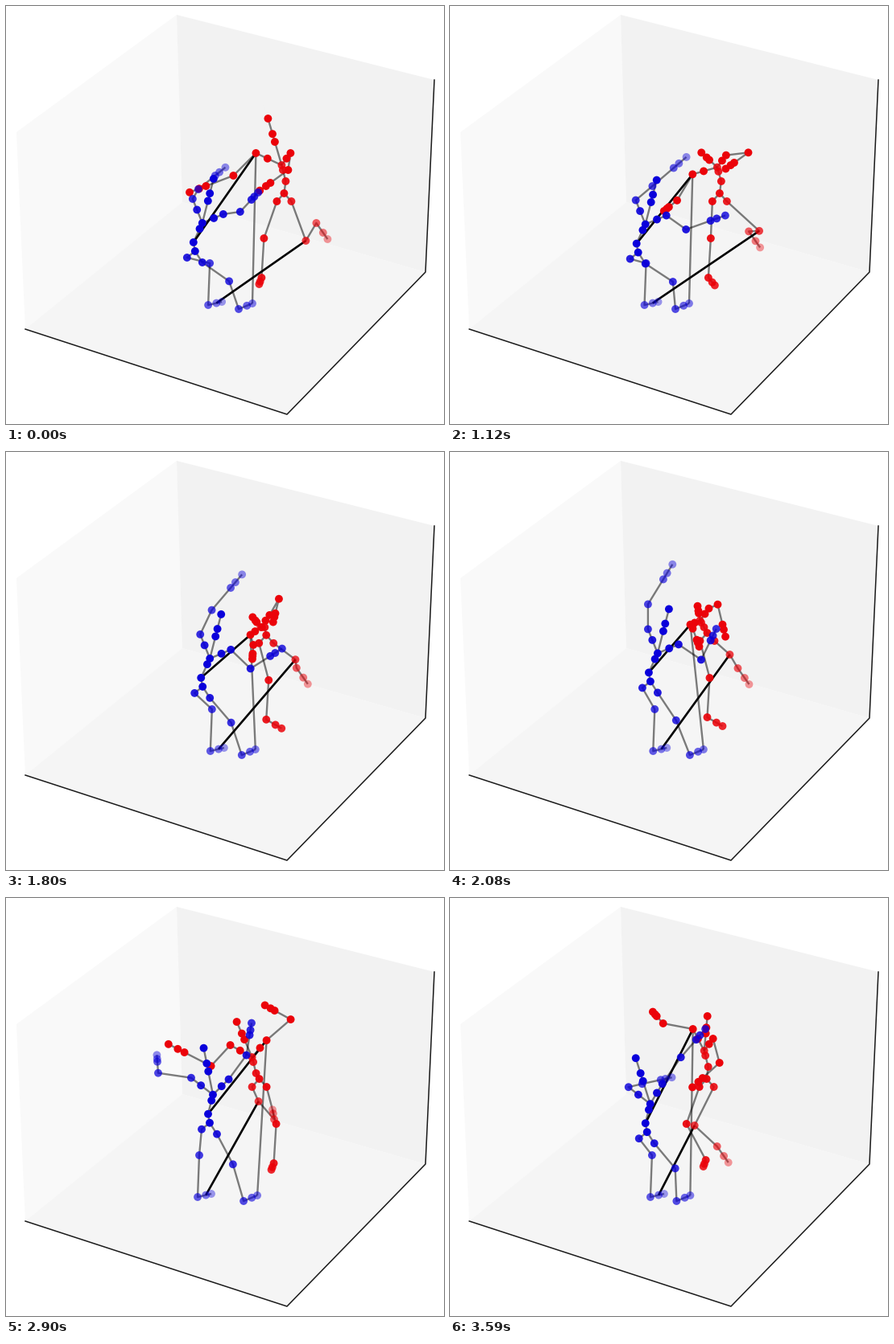
These frames come from a looping animation (544 by 520 pixels, 3690 ms). A matplotlib script:

```python
import numpy as np
import matplotlib.pyplot as plt
from matplotlib.animation import FuncAnimation
from matplotlib.collections import LineCollection
from matplotlib.patches import Polygon

W, H, DPI = 544, 520, 100
LOOP, TICK = 3690, 10

# moments at which the picture moves on
STEPS = np.sort(np.r_[0, 40, 110, 330, 410:900:100, 900, 1010:2500:100,
                      1680:2400:100, 2500:3590:100, 3590])


# Points and offsets are complex numbers in pixels, y pointing down.

def ramp(ms, start, end):
    u = np.clip((ms - start) / (end - start), 0, 1)
    return u * u * (3 - 2 * u)


def wave(ms, peak, period):
    return np.cos(2 * np.pi * (ms - peak) / period)


def swing(keys):
    """Limb offset turning on arcs through {ms: offset}, without overshoot."""
    times = np.array(list(keys), float)
    offsets = np.array(list(keys.values()))
    # rows: angle, log length
    polar = np.array([np.unwrap(np.angle(offsets)), np.log(np.abs(offsets))])
    span = np.diff(times)
    rate = np.diff(polar) / span
    before, after = rate[:, :-1], rate[:, 1:]
    same_way = before * after > 0
    total = np.where(same_way, before + after, 1)
    inner = np.where(same_way, 2 * before * after / total, 0)
    slope = np.hstack([rate[:, :1], inner, rate[:, -1:]])

    def at(ms):
        ms = np.clip(ms, times[0], times[-1])
        i = min(np.searchsorted(times, ms, side="right") - 1, len(span) - 1)
        u = (ms - times[i]) / span[i]
        ease = u * u * (3 - 2 * u)
        angle, size = (polar[:, i] * (1 - ease) + polar[:, i + 1] * ease
                       + span[i] * u * (1 - u) ** 2 * slope[:, i]
                       - span[i] * u * u * (1 - u) * slope[:, i + 1])
        return np.exp(size + 1j * angle)

    return at


def torso(low, pelvis, chest):
    return [low, pelvis, pelvis + 0.7 * (chest - pelvis), chest]


def head(chest, tip):
    return [chest] + [chest + f * tip for f in (0.5, 0.67, 1)]


def arm(chest, shoulder, upper, fore):
    joint = chest + shoulder
    elbow = joint + upper
    wrist = elbow + fore
    return [chest, chest + 0.55 * shoulder, joint, elbow, wrist,
            wrist + 0.25 * fore, wrist + 0.6 * fore]


def leg(low, hip, knee, ankle, foot):
    return [low, hip, knee, ankle, ankle + 0.6 * foot, ankle + foot]


blue_head = swing({2500: 14 - 55j, 3000: -18 - 57j})
blue_upper_l = swing({0: 7 - 12j, 710: 15 - 11j, 1510: 23 - 27j, 2080: -31j,
                      2500: -20 - 23j, 2900: -41 - 6j, 3590: 17 - 4j})
blue_fore_l = swing({0: 21 - 17j, 1510: 27 - 24j, 2080: 19 - 31j,
                     2500: 15 - 20j, 2900: -1 - 14j, 3590: 23 - 5j})
blue_upper_r = swing({0: 21 - 3j, 710: 24 + 7j, 1510: 23 + 25j, 2080: 28 + 19j,
                      2500: 32 - 7j, 2900: 22 - 30j, 3590: 23 - 33j})
blue_fore_r = swing({0: 14 - 15j, 710: 31 - 12j, 1510: 29 - 10j,
                     2500: -1 - 25j, 2900: 4 - 25j, 3590: 19 - 22j})


def blue_pose(ms):
    """Sways over planted feet: torso, head, left and right arm, legs."""
    lift = -wave(ms, 600, 4200)
    pelvis = 240 + 284j + (11.5 - 16j) * lift
    low = pelvis + 2 + 11j
    chest = pelvis + 11 - 24j - 5 * ramp(ms, 2500, 2900)
    shoulder_l = -12 - 30j + (-15 + 9j) * ramp(ms, 2500, 2900)
    shoulder_r = 26 - 11j - (11 + 14j) * ramp(ms, 2400, 3300)
    ankle_l = 246 + 372j + 8 * wave(ms, 1850, 2150)
    ankle_r = 289 + 377j + 11 * wave(ms, 2400, 3200)
    return [
        torso(low, pelvis, chest),
        head(chest, blue_head(ms)),
        arm(chest, shoulder_l, blue_upper_l(ms), blue_fore_l(ms)),
        arm(chest, shoulder_r, blue_upper_r(ms), blue_fore_r(ms)),
        leg(low, pelvis - 8 + 19j, ankle_l + 2 - 52j, ankle_l, 17 - 4j),
        leg(low, pelvis + 11 + 25j, 279 + 338j + (3 - 7j) * lift, ankle_r,
            17 - 7j),
    ]


red_head = swing({0: -17 - 58j, 710: -26 - 44j, 1510: -13 - 8j, 2080: -3 - 18j,
                  2500: 2 - 51j, 2900: -19 - 44j, 3590: 4 - 43j})
red_shoulder = swing({0: -32 - 15j, 710: -39 - 10j, 1510: -16 + 14j,
                      2080: -12 + 5j, 2500: 19 - 12j, 2900: 18 - 21j,
                      3590: -14 - 27j})
red_upper_a = swing({0: -28 + 28j, 710: -33 + 26j, 1510: 1 + 29j, 2080: 3 + 5j,
                     2500: 20 + 16j, 2900: 30 - 26j, 3590: -37 - 7j})
red_fore_a = swing({0: -34 + 13j, 710: -19 + 10j, 1510: -5 + 8j, 2080: 5 + 14j,
                    2500: -12 - 19j, 2900: -20 - 11j, 3590: -8 - 9j})
red_upper_b = swing({0: -3 + 21j, 710: 6 + 18j, 1510: 12 - 39j, 2080: 11 - 5j,
                     2500: -33 + 17j, 2900: -24 + 26j, 3590: 8 + 30j})
red_fore_b = swing({0: -22 + 16j, 710: -27 + 16j, 1510: -10 + 11j,
                    2080: 6 + 25j, 2500: -20 - 21j, 2900: -33 - 17j,
                    3590: -21 + 19j})
red_thigh = swing({0: 18 + 49j, 710: 32 + 49j, 1510: 39 + 25j, 2080: 19 + 17j,
                   2500: 23 + 20j, 2900: 8 + 18j, 3590: -24 + 48j})
red_shin = swing({0: 13 - 22j, 400: 12 - 22j, 710: -10 - 23j, 1510: -3 + 6j,
                  2080: 10 + 17j, 3590: 28 + 26j})


def red_pose(ms):
    """Kicks, bends, turns round and turns back; limbs ordered as for blue."""
    rise = ramp(ms, 2900, 3590)
    turn = ramp(ms, 2080, 2500)
    stride = ramp(ms, 710, 1510)
    crouch = ramp(ms, 1300, 2100) - rise
    bend = np.exp(-((ms - 1750) / 450) ** 2)
    facing = np.cos(np.pi * (turn - ramp(ms, 2900, 3500)))

    pelvis = 329 + 218j + 19 * wave(ms, 200, 5000) - 8j * rise
    low = pelvis - 2 + 15j + (6 - 8j) * crouch
    chest = pelvis - 5 - 20j + 20j * bend
    hip_l, hip_r = low + 9 * facing + 10j, low - 9 * facing + 10j
    knee_l = hip_l + red_thigh(ms)
    knee_r = hip_r - 16 + 46j + 28 * (stride - rise)
    ankle_l = knee_l + red_shin(ms)
    ankle_r = knee_r - 3 + 49j + (27 - 4j) * rise
    foot_l = 14 + 20j - (16 + 32j) * (turn - rise)
    foot_r = -3 + 8j + (22 + 3j) * (stride - ramp(ms, 2500, 2900))
    return [
        torso(low, pelvis, chest),
        head(chest, red_head(ms)),
        arm(chest, red_shoulder(ms), red_upper_a(ms), red_fore_a(ms)),
        arm(chest, -8 - 15j + 19 * facing, red_upper_b(ms), red_fore_b(ms)),
        leg(low, hip_l, knee_l, ankle_l, foot_l),
        leg(low, hip_r, knee_r, ankle_r, foot_r),
    ]


fig = plt.figure(figsize=(W / DPI, H / DPI), dpi=DPI, facecolor="white")
ax = fig.add_axes([0, 0, 1, 1])
ax.set(xlim=(0, W), ylim=(H, 0))
ax.axis("off")

# room: two walls, a floor and three axis lines
top, back, left, right = (212, 11), (219, 244), (24, 402), (521, 331)
near, left_top, right_top = (349, 508), (13, 157), (532, 92)
for corners, grey in [((top, left_top, left, back), "0.975"),
                      ((top, right_top, right, back), "0.95"),
                      ((left, near, right, back), "0.9625")]:
    ax.add_patch(Polygon(corners, facecolor=grey, edgecolor="none", zorder=0))
ax.plot(*zip(left, near, right, right_top), color="0.1", lw=1.1, zorder=1)

bone_lines = LineCollection([], colors=[(0, 0, 0, 0.5)], linewidths=1.7, zorder=2)
link_lines = LineCollection([], colors="black", linewidths=1.9, zorder=3)
ax.add_collection(bone_lines)
ax.add_collection(link_lines)

# opacity at the far end of each limb
BLUE_FADES = (1, 1, 0.45, 0.8, 0.4, 0.5)
RED_FADES = (0.85, 1, 1, 1, 0.4, 0.85)


def joint_dots(rgb, fades, sizes, zorder):
    colors = [(*rgb, 1 - (1 - fade) * (i + 1) / n)
              for fade, n in zip(fades, sizes) for i in range(n)]
    dots = ax.scatter(np.zeros(len(colors)), np.zeros(len(colors)), s=50,
                      c=colors, linewidths=0, zorder=zorder)
    return dots


def joints(chains):
    """All joints once: limbs skip the root they share with the torso."""
    return chains[0] + [p for chain in chains[1:] for p in chain[1:]]


def xy(points):
    return np.column_stack([np.real(points), np.imag(points)])


SIZES = (4, 3, 6, 6, 5, 5)
red_dots = joint_dots((0.92, 0.01, 0.04), RED_FADES, SIZES, 4)
blue_dots = joint_dots((0.04, 0, 0.86), BLUE_FADES, SIZES, 5)


def update(frame):
    ms = STEPS[np.searchsorted(STEPS, frame * TICK, side="right") - 1]
    blue, red = blue_pose(ms), red_pose(ms)
    blue_dots.set_offsets(xy(joints(blue)))
    red_dots.set_offsets(xy(joints(red)))
    shoulder, knee = red[2][2], red[4][2]
    pelvis, foot, toe = blue[0][1], blue[4][4], blue[5][5]
    bone_lines.set_segments([xy(c) for c in blue + red + [[toe, shoulder]]])
    link_lines.set_segments([xy([pelvis, shoulder]), xy([foot, knee])])
    return bone_lines, link_lines, red_dots, blue_dots


anim = FuncAnimation(fig, update, frames=LOOP // TICK, interval=TICK,
                     repeat=True, repeat_delay=0)
plt.show()
```
